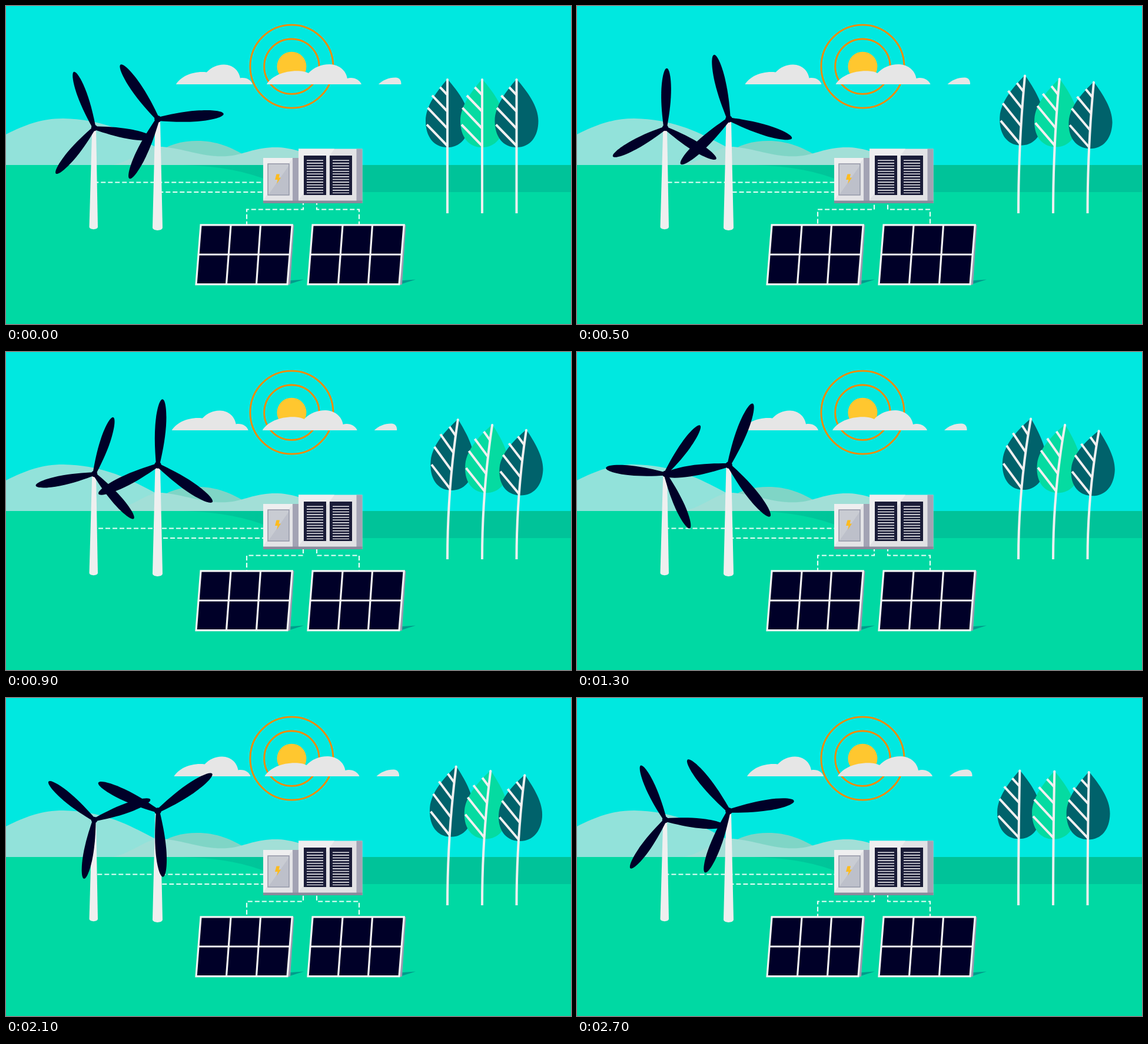
Recreate the animation shown at these times as an HTML page. Size 960 by 540 pixels, loop 2.8 s.

```html
<!DOCTYPE html>
<html lang="en">
<head>
<meta charset="utf-8">
<title>Clean energy</title>
<style>
  html, body { margin: 0; width: 100%; height: 100%; overflow: hidden; background: #00e8e0; }
  svg { display: block; width: 960px; height: 540px; }
  .cloud { fill: #e6e6e6; }
  .cable { fill: none; stroke: #e9fff8; stroke-width: 2.2; stroke-dasharray: 8 4; }
  .tower { fill: #efefef; }
  .blades { fill: #000028; }
  .ring { fill: none; stroke: #fb8800; stroke-width: 2.8; }
  .frame { fill: #000028; stroke: #f4f4f4; stroke-width: 3.2; }
  .bars { fill: none; stroke: #f4f4f4; stroke-width: 3.2; }
  .wood { fill: none; stroke: #f0f0f0; stroke-width: 4; stroke-linejoin: round; }
</style>
</head>
<body>
<svg viewBox="0 0 960 540">
  <defs>
    <linearGradient id="band" gradientUnits="userSpaceOnUse" x1="310" y1="0" x2="500" y2="0">
      <stop offset="0" stop-color="#00c99b"/>
      <stop offset="1" stop-color="#00c399"/>
    </linearGradient>
    <path id="blade" d="M-3,0 C-6,-20 -9.2,-42 -9.2,-67 C-9.1,-93 -5,-112 0,-112 C5,-112 9.1,-93 9.2,-67 C9.2,-42 6,-20 3,0Z"/>
    <g id="rotor">
      <circle r="5.8"/>
      <use href="#blade"/>
      <use href="#blade" transform="rotate(120)"/>
      <use href="#blade" transform="rotate(240)"/>
    </g>
    <g id="panel">
      <path d="M479,473 L483,466 L506,464.5Z" fill="#009d8c"/>
      <path d="M485,371 L489.5,372 L483,473 L477,474Z" fill="#9b9bb0"/>
      <path class="frame" d="M331,371.8 H486.2 L478,472.7 H323Z"/>
      <path class="bars" d="M382,372 L374.5,472 M432.5,372 L425.5,472 M327,422 H482"/>
    </g>
    <g id="vent">
      <rect x="506" y="254" width="38" height="67" fill="#1a1c38"/>
      <path d="M525,261.5 V318" stroke="#e4e4e8" stroke-width="28" stroke-dasharray="1.6 3"/>
    </g>
  </defs>

  <rect width="960" height="540" fill="#00e8e0"/>
  <path d="M0,218 C32,202 60,191 97,191 C160,192 202,212 240,232 C268,246 290,260 320,270 H0Z" fill="#92e2da"/>
  <path d="M235,270 C260,240 290,229 325,229 C365,229 395,245 430,270Z" fill="#7fd5c6"/>
  <path d="M180,270 C215,264 235,239 265,239 C310,243 340,260 385,254 C408,250 428,239 462,240 C490,241 515,252 560,270Z" fill="#a2dfd7"/>
  <rect y="270" width="960" height="270" fill="#00d9a3"/>
  <path d="M300,270 C370,272 410,283 437,293 C460,303 490,316 530,316 H960 V270Z" fill="url(#band)"/>

  <circle cx="485.4" cy="102.7" r="70.5" class="ring"/>
  <circle cx="485.4" cy="102.7" r="46.7" class="ring"/>
  <circle cx="485.4" cy="102.7" r="25" fill="#ffc72f"/>
  <g id="clouds" class="cloud">
    <path d="M289,133 C297,120 317,110 341,112.5 C349,104 360,99 371,99.5 C386,100 396,110 398,122.5 C408,120.5 417,126 419,133Z"/>
    <path d="M443,133 C452,118 475,109 500,110.5 C506,111 510,112 514,114 C523,104 537,98.5 551,99 C567,100 578,110 580,123 C590,120 601,125 604,133Z"/>
    <path d="M633,133 C640,126 650,121.5 662,121.5 C669,121.5 672,127 671.5,133Z"/>
  </g>

  <g id="trees"></g>

  <path class="cable" data-gap="7" d="M150,299.5 H437"/>
  <path class="cable" data-gap="10" d="M257,316 H437"/>
  <path class="cable" data-gap="5" d="M409,371 V345.5 H505 V334"/>
  <path class="cable" data-gap="5" d="M600,371 V345.5 H528 V334"/>

  <rect x="437" y="258" width="50" height="77" fill="#e4e4e7"/>
  <path d="M437,258 H487 L437,330Z" fill="#efeff0"/>
  <rect x="487" y="258" width="11" height="77" fill="#a3a3b4"/>
  <rect x="437" y="330.5" width="61" height="4.5" fill="#8a8a9c"/>
  <rect x="445" y="268" width="36" height="53" fill="#bdc0ca" stroke="#9598a8" stroke-width="1.5"/>
  <path d="M446,269 H480 V272 L446,320Z" fill="#c9ccd3"/>
  <path d="M459.5,285.5 H465 L463.5,291.5 H467 L460,302 L461.5,295 H457Z" fill="#fdbb1f"/>

  <rect x="497" y="242.5" width="108.5" height="92.5" fill="#e2e2e5"/>
  <path d="M497,242.5 H558 L497,330Z" fill="#eeeeef"/>
  <rect x="595.5" y="242.5" width="10" height="92.5" fill="#a3a3b4"/>
  <rect x="497" y="330.5" width="108.5" height="4.5" fill="#8a8a9c"/>
  <use href="#vent"/>
  <use href="#vent" x="44"/>

  <use href="#panel"/>
  <use href="#panel" x="190"/>

  <path class="tower" d="M146.3,207 H153 L156,375 C156,380.5 141.5,380.5 141.5,375Z"/>
  <use class="blades" href="#rotor" id="rear"/>
  <path class="tower" d="M253.5,194 H262 L266,376 C266,382.5 249,382.5 249,376Z"/>
  <use class="blades" href="#rotor" id="front"/>
</svg>
<script>
  const LOOP = 2800, STEP = 100, ROOT = 352, AXIS = 822;
  const $ = id => document.getElementById(id);
  const cables = [...document.querySelectorAll('.cable')];
  const bending = [];

  function addPath(d, attrs) {
    const el = document.createElementNS('http://www.w3.org/2000/svg', 'path');
    for (const key in attrs) el.setAttribute(key, attrs[key]);
    $('trees').append(el);
    bending.push({ el, d });
  }

  function addTree(x, fill) {
    const shift = d => d.replace(/(-?[\d.]+),/g, (_, n) => x + +n + ',');
    addPath(shift('M0,124 C-18,145 -37,170 -37,195 C-37,222 -23,240 0,240 C23,240 37,222 37,195 C37,170 18,145 0,124Z'), { fill });
    addPath(shift('M-12.5,138 L0,151 M-26,152 L0,179 M-33.5,173 L0,208 M-35,201.5 L0,237.5'), { class: 'wood' });
    const trunk = Array.from({ length: 11 }, (_, i) => `0,${ROOT - i * 22.7}`);
    addPath(shift('M' + trunk.join(' L')), { class: 'wood' });
    addPath(shift('M0,125 L0,125.1'), { class: 'wood', 'stroke-linecap': 'round' });
  }

  // Bends the upright plane into an arc that starts at the ground line.
  function bend(d, k) {
    return d.replace(/(-?[\d.]+),(-?[\d.]+)/g, (_, x, y) => {
      const a = k * (ROOT - y), u = x - AXIS;
      const px = AXIS + (1 - Math.cos(a)) / k + u * Math.cos(a);
      const py = ROOT - Math.sin(a) / k + u * Math.sin(a);
      return px.toFixed(2) + ',' + py.toFixed(2);
    });
  }

  function draw(t) {
    const p = t / LOOP;
    $('front').setAttribute('transform', `translate(258 192) rotate(${-34.5 + 120 * p})`);
    $('rear').setAttribute('transform', `translate(150 207) rotate(${-20 + 120 * p}) scale(.905)`);

    const drift = -4.5 * (1 - Math.cos(2 * Math.PI * (t + 100) / LOOP));
    $('clouds').setAttribute('transform', `translate(${drift} 0)`);

    const k = 1e-6 + 7.8e-4 * Math.sin(Math.PI * p);
    for (const { el, d } of bending) el.setAttribute('d', bend(d, k));

    const flow = 24 * (t - 900) / LOOP;
    for (const c of cables) c.style.strokeDashoffset = -(+c.dataset.gap + flow);
  }

  addTree(750, '#00626b');
  addTree(809, '#05dba1');
  addTree(867.5, '#00626b');

  function tick(now) {
    draw(Math.floor(now / STEP) * STEP % LOOP);
    requestAnimationFrame(tick);
  }
  draw(0);
  requestAnimationFrame(tick);
</script>
</body>
</html>
```
